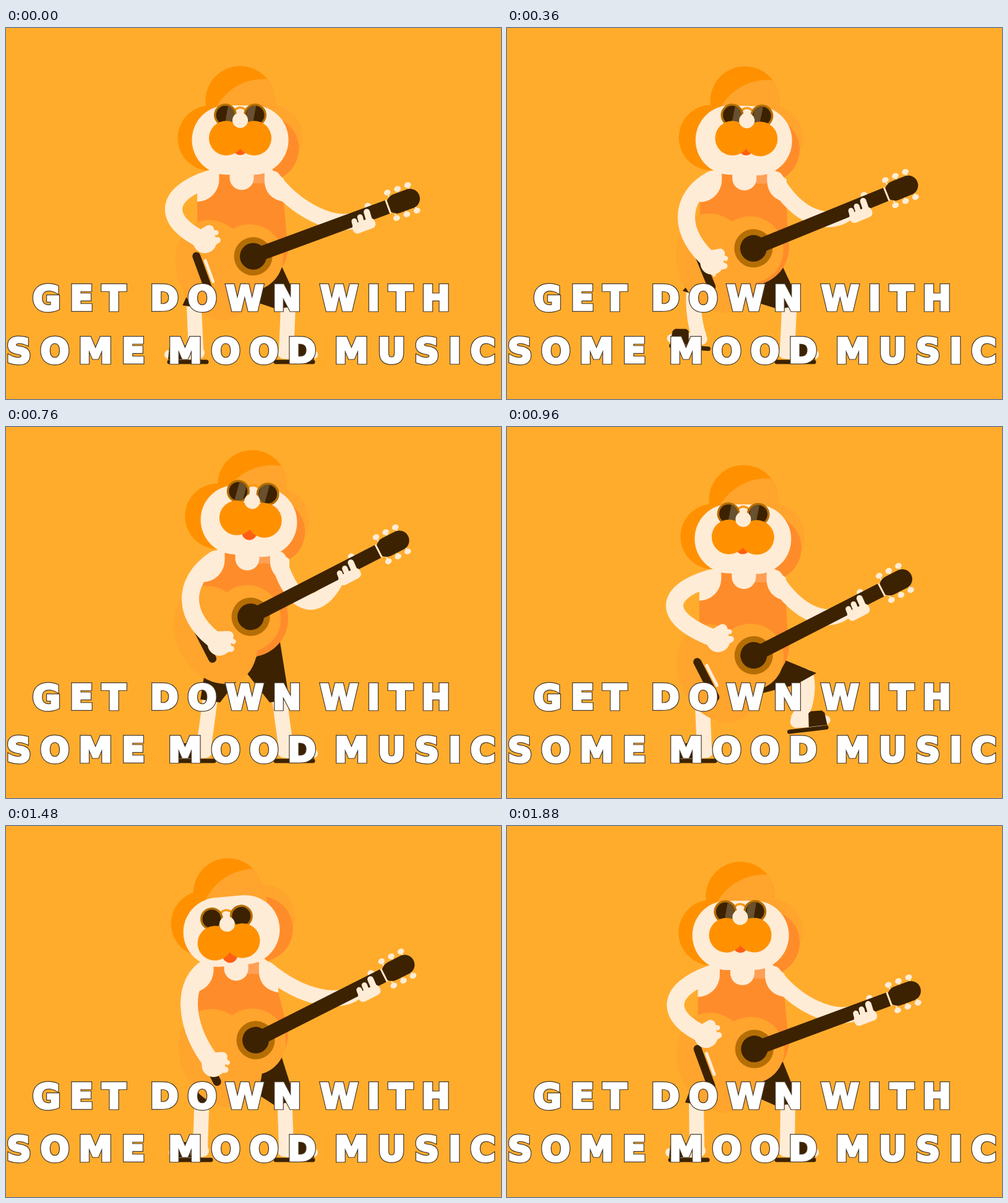
An HTML page with a canvas that plays this animation: 800 px wide and 600 px high, repeating every 1.92 s.

```html
<!DOCTYPE html>
<html lang="en">
<head>
<meta charset="utf-8">
<title>Mood music</title>
<style>
  html, body { margin: 0; width: 100%; height: 100%; overflow: hidden; background: #ffac2d; }
  canvas, svg { position: absolute; left: 0; top: 0; width: 800px; height: 600px; }
  text { font: bold 55px "DejaVu Sans", sans-serif; letter-spacing: 15px; }
  .edge { fill: #4b3b2a; stroke: #4b3b2a; stroke-width: 6px; }
  .face { fill: #fff; stroke: #fff; stroke-width: 3.6px; }
</style>
</head>
<body>
<canvas id="stage" width="800" height="600"></canvas>
<svg viewBox="0 0 800 600">
  <defs>
    <g id="words">
      <text y="455.5"><tspan x="43">GET</tspan> <tspan x="233">DOWN</tspan> <tspan x="508">WITH</tspan></text>
      <text y="540.5"><tspan x="1">SOME</tspan> <tspan x="262">MOOD</tspan> <tspan x="531">MUSIC</tspan></text>
    </g>
  </defs>
  <use href="#words" class="edge"/>
  <use href="#words" class="face"/>
</svg>
<script>
const LOOP = 1920, BEAT = LOOP / 2, STEP = 40, CENTER = 386;
const SKIN = '#ffecd6', HAIR = '#ff9100', LIGHT = '#ffa42d', TANK = '#ff8c2b',
      DARK = '#3c2200', GOLD = '#b56e04', GLARE = '#69502e', MOUTH = '#ff5f14';
const ctx = document.getElementById('stage').getContext('2d');
const rad = deg => deg * Math.PI / 180;

// Smooth periodic curve through [time, value] key points, without overshoot
function curve(period, ...keys) {
  const n = keys.length;
  const next = i => keys[(i + 1) % n];
  const gap = i => (next(i)[0] - keys[i][0] + period) % period;
  const rise = i => (next(i)[1] - keys[i][1]) / gap(i);
  const slope = keys.map((_, i) => {
    const a = rise((i + n - 1) % n), b = rise(i);
    return a * b > 0 ? 2 * a * b / (a + b) : 0;
  });
  return time => {
    const t = time % period;
    let i = n - 1;
    while (keys[i][0] > t) i--;
    const h = gap(i), u = (t - keys[i][0]) / h, v = 1 - u;
    return keys[i][1] * (1 + 2 * u) * v * v + next(i)[1] * (3 - 2 * u) * u * u
         + h * u * v * (slope[i] * v - slope[(i + 1) % n] * u);
  };
}

const bounce = curve(BEAT, [0, .06], [200, 0], [360, .04], [520, .43], [760, 1], [920, .2]);
const strumming = curve(BEAT, [0, 0], [200, .72], [360, .7], [520, .95], [760, 1], [920, .05]);
const swaying = curve(LOOP, [0, 0], [360, .3], [760, 1], [960, .2], [1160, -.5], [1480, -1]);
const raising = curve(LOOP, [0, 0], [360, .28], [760, 1], [1480, .95]);
const sliding = curve(LOOP, [0, 1], [440, 0], [1160, 0], [1880, 1]);

// One step of a foot: 0 on the ground, 1 at the top
function stepArc(t, start) {
  const u = (t - start) / 440;
  return u > 0 && u < 1 ? Math.sin(Math.PI * u) : 0;
}

function poseAt(t) {
  const lift = bounce(t), strum = strumming(t), sway = swaying(t), angle = 2 * Math.PI * t / LOOP;
  const wave = Math.sin(angle), up = Math.max(0, wave), duck = Math.max(0, -wave);
  const neckY = 264 - 32 * lift, holeY = 373 - 62 * lift - 18 * up ** 3;
  return {
    lift, holeY, neckY, sway,
    slide: 12 * sliding(t),
    faceX: 378.5 + 14 * sway, faceY: 183 - 31 * lift, tilt: 5.3 * sway,
    turn: 4.5 * wave, nod: -3 + 21 * duck, hairY: -13 * duck,
    lensUp: 37 + 6 * lift, mouth: 27 + 7 * Math.max(lift, duck),
    glareL: 8 - 4 * lift + 25 * duck ** 3, glareR: -8 + 40 * duck ** 2,
    neckX: 381 + 9 * sway, bellyY: 356 - 46 * lift,
    holeX: 399.5 - 4 * sway, neckA: 20.2 + 7 * raising(t), grip: 186 - 13 * sway,
    elbowL: [271 + 27 * strum, neckY + 29 + 20 * strum],
    elbowR: [497 - 10 * sway, neckY + 38 + 12 * sway],
    hand: [331 - 10 * Math.cos(angle) + 6 * strum, holeY - 25 + 68 * strum],
    handA: -20 + 28 * strum
  };
}

function disc(x, y, rx, color, ry = rx) {
  ctx.fillStyle = color;
  ctx.beginPath();
  ctx.ellipse(x, y, rx, ry, 0, 0, 7);
  ctx.fill();
}

function poly(points, color) {
  ctx.fillStyle = color;
  ctx.beginPath();
  points.forEach(p => ctx.lineTo(...p));
  ctx.fill();
}

function box(x, y, w, h, r, color) {
  ctx.fillStyle = color;
  ctx.beginPath();
  ctx.roundRect(x, y, w, h, r);
  ctx.fill();
}

function line(x1, y1, x2, y2, width, color, cap = 'round') {
  ctx.strokeStyle = color;
  ctx.lineWidth = width;
  ctx.lineCap = cap;
  ctx.beginPath();
  ctx.moveTo(x1, y1);
  ctx.lineTo(x2, y2);
  ctx.stroke();
}

// Bent tube from a to b whose middle passes through m
function limb(a, m, b, width) {
  const control = s => [0, 1].map(k =>
    (m[k] - (a[k] + b[k]) / 8) / .75 + s * (a[k] - b[k]));
  ctx.strokeStyle = SKIN;
  ctx.lineWidth = width;
  ctx.lineCap = 'round';
  ctx.beginPath();
  ctx.moveTo(...a);
  ctx.bezierCurveTo(...control(.22), ...control(-.22), ...b);
  ctx.stroke();
}

function at(x, y, deg, draw, flip = 1) {
  ctx.save();
  ctx.translate(x, y);
  ctx.scale(flip, 1);
  ctx.rotate(rad(deg));
  draw();
  ctx.restore();
}

function clipDisc(x, y, r, draw) {
  ctx.save();
  ctx.beginPath();
  ctx.arc(x, y, r, 0, 7);
  ctx.clip();
  draw();
  ctx.restore();
}

function foot() {
  line(-17, -15, 18, -12, 20, SKIN);
  disc(31, -12, 7, SKIN);
  poly([[2, -4], [4, -26], [8, -29], [26, -28], [30, -24], [32, -4]], DARK);
  line(-30, 0, 30, 0, 7, DARK);
}

// Drawn for the right side; flip -1 mirrors it about the body's middle
function leg(p, flip, arc, slide) {
  const hop = arc * arc, tilt = -7 * arc, a = rad(tilt);
  const kneeX = 71 - 15 * p.lift + 30 * hop, kneeY = 452 - 9 * p.lift - 48 * hop;
  const footX = 80 + 22 * hop, footY = 540 - 55 * hop;
  const ankleX = footX - 13 * Math.cos(a) + 20 * Math.sin(a);
  const ankleY = footY - 13 * Math.sin(a) - 20 * Math.cos(a);
  const hem = rad(-9 - 22 * hop), half = 19 - 3 * p.lift;
  const dx = half * Math.cos(hem), dy = half * Math.sin(hem);
  at(CENTER - slide, 0, 0, () => {
    limb([kneeX, kneeY - 4], [(kneeX + ankleX) / 2 + 7 * hop, (kneeY + ankleY) / 2],
         [ankleX, ankleY], 24);
    at(footX, footY, tilt, foot);
    poly([[54, p.bellyY + 20], [kneeX + dx, kneeY + dy], [kneeX - dx, kneeY - dy],
          [0, p.bellyY + 84]], DARK);
  }, flip);
}

function hair(p) {
  at(p.faceX, p.faceY, p.tilt, () => {
    const x = -p.turn, y = p.hairY;
    disc(47 + x, -5 + y, 53, LIGHT);
    clipDisc(42 + x, 14 + y, 53, () => {
      disc(42 + x, 14 + y, 53, TANK);
      disc(-9 + x, -30 + y, 66, LIGHT);
    });
    disc(-48 + x, -3 + y, 53, HAIR);
    const bunY = -64 + 5 * p.lift;
    disc(0, bunY, 56, HAIR);
    clipDisc(0, bunY, 56, () => disc(38, bunY + 52, 87, LIGHT));
  });
}

function lens(x, y, glare) {
  disc(x, y, 18.5, GOLD);
  disc(x, y, 15, DARK);
  clipDisc(x, y, 15, () => {
    const g = x + glare;
    poly([[g - 3, y - 17], [g + 10, y - 17], [g + 4, y + 17], [g - 9, y + 17]], GLARE);
  });
}

function head(p) {
  at(p.faceX, p.faceY, p.tilt, () => box(-78, -56, 156, 112, 56, SKIN));
  at(p.faceX + p.turn, p.faceY + p.nod, p.tilt, () => {
    const up = -p.lensUp;
    ctx.strokeStyle = '#f79a16';
    ctx.lineWidth = 3.5;
    ctx.beginPath();
    ctx.arc(0, up - 1, 11, rad(200), rad(340));
    ctx.stroke();
    lens(-24, up, p.glareL);
    lens(24, up, p.glareR);
    disc(0, p.mouth - 12, 12, MOUTH);
    disc(-22.5, 0, 28, HAIR);
    disc(22.5, 0, 28, HAIR);
    disc(0, -29, 12.5, SKIN);
  });
}

function torso(p) {
  const x = p.neckX, y = p.neckY, b = p.bellyY;
  poly([[x - 72, y + 20], [x - 72, y - 16], [x - 45, y - 36], [x + 45, y - 36],
        [x + 68, y - 18], [x + 68, y + 20]], SKIN);
  disc(394, b, 62, TANK);
  ctx.fillStyle = TANK;
  ctx.beginPath();
  ctx.moveTo(x - 36.5, y - 30);
  ctx.lineTo(x + 36.5, y - 30);
  ctx.lineTo(x + 36.5, y - 14);
  ctx.quadraticCurveTo(x + 39, y + 14, x + 68, y + 19);
  ctx.lineTo(454, b - 12);
  ctx.lineTo(440, b + 40);
  ctx.lineTo(320, b + 40);
  ctx.lineTo(x - 72, b - 30);
  ctx.lineTo(x - 72, y + 19);
  ctx.arc(x - 72.5, y - 17, 36, Math.PI / 2, 0, true);
  ctx.fill();
  ctx.fillStyle = '#ff9f56';
  ctx.fillRect(x + 16, y - 30, 20.5, 19);
  box(x - 19.5, y - 45, 39, 45, 19.5, SKIN);
}

function guitar(p) {
  at(p.holeX, p.holeY, -p.neckA, () => {
    disc(p.grip + 16, -12, 5.5, SKIN);
    disc(-64, 0, 63, LIGHT, 83);
    disc(-6, 0, 54, LIGHT);
    line(-86, -32, -86, 32, 13, DARK);
    line(-75, -20, -75, 16, 5, SKIN);
    disc(0, 0, 31, GOLD);
    disc(0, 0, 21.5, DARK);
    line(0, 0, 231, 0, 23, DARK, 'butt');
    for (const x of [239, 256.5, 274]) {
      line(x, -22, x, 22, 2, SKIN);
      for (const y of [-22, 22]) disc(x, y, 5.5, SKIN, 4.5);
    }
    line(232.5, -11.5, 232.5, 11.5, 2.5, SKIN, 'butt');
    ctx.fillStyle = DARK;
    ctx.beginPath();
    ctx.moveTo(234, -10);
    ctx.quadraticCurveTo(240, -16, 247, -16);
    ctx.lineTo(270, -16);
    ctx.arc(270, 0, 16, -Math.PI / 2, Math.PI / 2);
    ctx.lineTo(247, 16);
    ctx.quadraticCurveTo(240, 16, 234, 10);
    ctx.fill();
  });
}

function frettingHand(p) {
  at(p.holeX, p.holeY, -p.neckA, () => {
    const g = p.grip;
    box(g - 20, 7, 38, 17, 7, SKIN);
    line(g - 14, 12, g - 13, 3, 9, SKIN);
    line(g - 3, 12, g - 2, 0, 9, SKIN);
    line(g + 10, 13, g + 11, -4, 10, SKIN);
  });
}

function strummingHand(p) {
  at(...p.hand, p.handA, () => {
    disc(0, 1, 19, SKIN);
    line(-4, -11, 13, -14, 16, SKIN);
    line(10, -12, 22, -6, 8, SKIN);
    line(8, 8, 20, 6, 10, SKIN);
  });
}

function draw(t) {
  const p = poseAt(t);
  ctx.fillStyle = '#ffac2d';
  ctx.fillRect(0, 0, 800, 600);

  hair(p);
  leg(p, -1, stepArc(t, 20), p.slide);
  leg(p, 1, stepArc(t, 780), 0);
  torso(p);

  const a = rad(p.neckA), g = p.grip - 12;
  const wrist = [p.holeX + g * Math.cos(a), p.holeY - g * Math.sin(a) + 2];
  limb([p.neckX + 50, p.neckY - 18], p.elbowR, wrist, 26);
  guitar(p);
  frettingHand(p);

  limb([p.neckX - 52, p.neckY - 18], p.elbowL, p.hand, 28);
  strummingHand(p);
  head(p);
}

const start = performance.now();
function tick() {
  const t = (performance.now() - start) % LOOP;
  draw(Math.floor(t / STEP) * STEP);
  requestAnimationFrame(tick);
}
tick();
</script>
</body>
</html>
```
